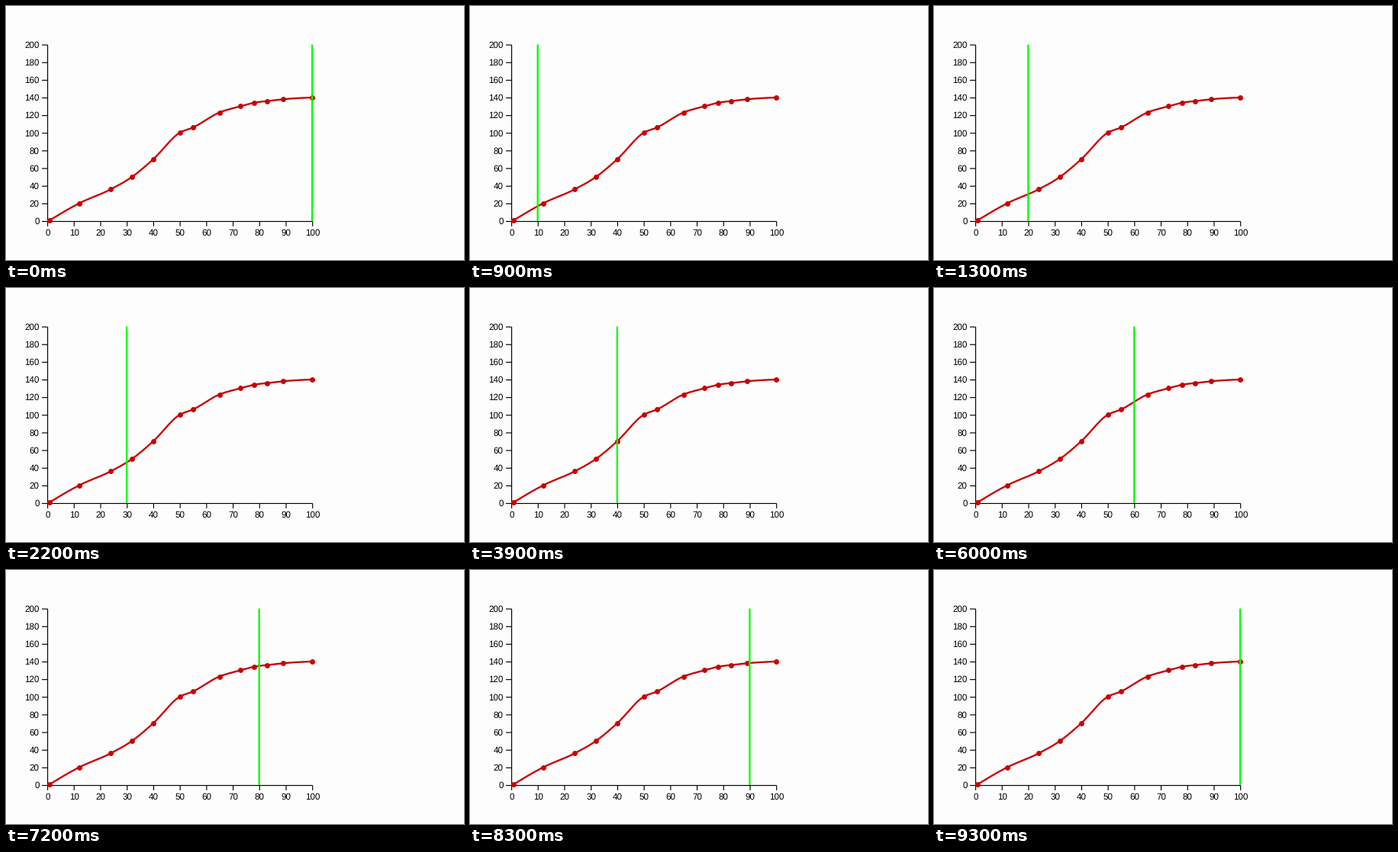
Animation, 600 px wide and 333 px high, one loop 9.6 s. Source, as a matplotlib script:

```python
import numpy as np
import matplotlib.pyplot as plt
from matplotlib.animation import FuncAnimation

plt.rcParams["font.family"] = "Liberation Sans"
plt.rcParams["text.hinting"] = "none"

W, H, DPI = 600, 333, 100
PX = 72 / DPI                 # points per pixel
SCALE = 1.157                 # chart unit in pixels
LEFT, BASE = 54.0, 281.9      # pixel position of the data origin
HALF = 0.5 * SCALE
INTERVAL, FRAMES = 100, 96
RED, GREEN, BACK = "#c80000", "#00ff00", "#fefdfe"

POINTS = np.array([
    (1, 1), (12, 20), (24, 36), (32, 50), (40, 70), (50, 100), (55, 106),
    (65, 123), (73, 130), (78, 134), (83, 136), (89, 138), (100, 140),
], float)

# Times in ms at which the marker jumps to 10, 20, ... 100
JUMPS = [200, 1300] + list(range(2200, 9400, 1000))
JUMPS = JUMPS[:9] + [9300] if len(JUMPS) < 10 else JUMPS


def sx(value):
    return LEFT + value * 3 * SCALE


def sy(value):
    return BASE - value * SCALE


def monotone_curve(x, y, steps=24):
    """Cubic Hermite curve through the points that never overshoots."""
    h = np.diff(x)
    s = np.diff(y) / h
    mean = (s[:-1] * h[1:] + s[1:] * h[:-1]) / (h[:-1] + h[1:])
    limit = np.minimum(np.minimum(abs(s[:-1]), abs(s[1:])), abs(mean) / 2)
    inner = (np.sign(s[:-1]) + np.sign(s[1:])) * limit
    m = np.concatenate([[(3 * s[0] - inner[0]) / 2], inner,
                        [(3 * s[-1] - inner[-1]) / 2]])
    t = np.linspace(0, 1, steps)
    xs, ys = [], []
    for i in range(len(h)):
        xs.append(x[i] + h[i] * t)
        ys.append(y[i] * (1 + 2 * t) * (1 - t) ** 2
                  + m[i] * h[i] * t * (1 - t) ** 2
                  + y[i + 1] * t ** 2 * (3 - 2 * t)
                  + m[i + 1] * h[i] * t ** 2 * (t - 1))
    return np.concatenate(xs), np.concatenate(ys)


fig = plt.figure(figsize=(W / DPI, H / DPI), dpi=DPI, facecolor=BACK)
ax = fig.add_axes([0, 0, 1, 1])
ax.set_xlim(0, W)
ax.set_ylim(H, 0)
ax.axis("off")


def stroke(xs, ys, color, width, **kw):
    line, = ax.plot(xs, ys, color=color, lw=width * PX, snap=False,
                    solid_capstyle="butt", **kw)
    return line


def label(x, y, value, align):
    ax.text(x, y, str(value), ha=align, va="baseline", color="black",
            fontsize=10 * SCALE * PX)


def draw_axes():
    tick, gap, size = 6 * SCALE, 9 * SCALE, 10 * SCALE
    x0, y0 = LEFT + HALF, BASE + HALF
    stroke([x0, x0], [sy(200) + HALF, y0], "black", SCALE)
    stroke([x0, sx(100) + HALF], [y0, y0], "black", SCALE)
    for v in range(0, 201, 20):
        y = sy(v) + HALF
        stroke([LEFT - tick, x0], [y, y], "black", SCALE)
        label(LEFT - gap, y + 0.32 * size, v, "right")
    for v in range(0, 101, 10):
        x = sx(v) + HALF
        stroke([x, x], [y0, BASE + tick], "black", SCALE)
        label(x, BASE + gap + 0.71 * size, v, "center")


draw_axes()
px, py = sx(POINTS[:, 0]), sy(POINTS[:, 1])
stroke(*monotone_curve(px, py), RED, 2 * SCALE, solid_joinstyle="round")
ax.plot(px, py, "o", color=RED, ms=6 * SCALE * PX, mew=0, snap=False)
marker = stroke([sx(100)] * 2, [sy(200), sy(0)], GREEN, 2 * SCALE, zorder=5)


def update(frame):
    step = sum(frame * INTERVAL >= t for t in JUMPS) or 10
    marker.set_xdata([sx(10 * step)] * 2)
    return marker,


anim = FuncAnimation(fig, update, frames=FRAMES, interval=INTERVAL,
                     repeat=True, repeat_delay=0, blit=False)
plt.show()
```
